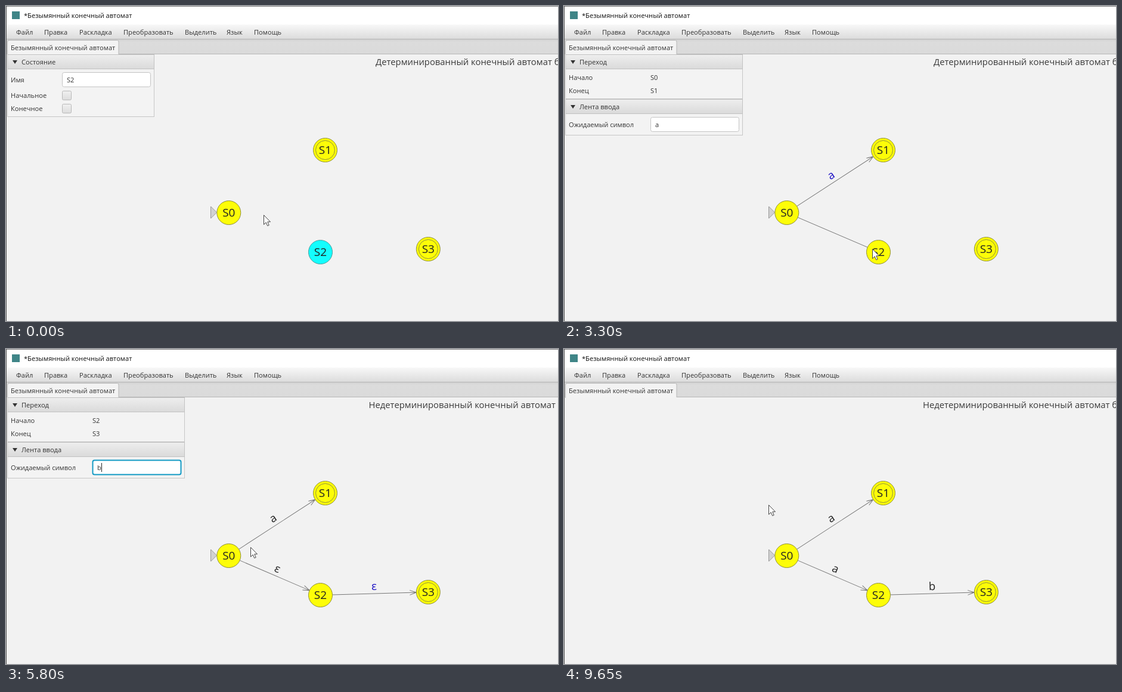
An HTML page that plays this animation: 926 px wide and 528 px high, repeating every 9.9 s.

```html
<!DOCTYPE html>
<html lang="ru">
<head>
<meta charset="utf-8">
<title>Конечный автомат</title>
<style>
  html, body { margin: 0; width: 100%; height: 100%; overflow: hidden; background: #f2f2f2; }
  svg { display: block; width: 926px; height: 528px; }
  text { font: 11.1px "Open Sans", "Noto Sans", sans-serif; fill: #333; white-space: pre; }
  .heading { font-size: 14.85px; fill: #3a3a3a; }
  .name { font-size: 19px; fill: #222; text-anchor: middle; }
  .label { font-size: 18.5px; fill: #222; text-anchor: middle; }
  .label.on { fill: #1c10c4; }
  .line { fill: none; stroke: #777; }
  .node circle { fill: #fdfd08; stroke: #8f8f3a; }
  .node.on circle { fill: #14fdfd; stroke: #4d9c9c; }
  .frame { fill: #f3f3f3; stroke: #c6c6c6; }
  .head { fill: url(#headFill); stroke: #c2c2c2; }
  .field { fill: #fff; stroke: #c4c4c4; }
  .field.on { stroke: #139ac4; stroke-width: 2; }
  .check { fill: url(#checkFill); stroke: #b8b8b8; }
</style>
</head>
<body>
<svg viewBox="0 0 926 528">
  <defs>
    <linearGradient id="menuFill" x2="0" y2="1"><stop stop-color="#f8f8f8"/><stop offset="1" stop-color="#dcdcdc"/></linearGradient>
    <linearGradient id="tabsFill" x2="0" y2="1"><stop stop-color="#cfcfcf"/><stop offset=".2" stop-color="#dcdcdc"/><stop offset="1" stop-color="#dadada"/></linearGradient>
    <linearGradient id="headFill" x2="0" y2="1"><stop stop-color="#eeeeee"/><stop offset="1" stop-color="#dadada"/></linearGradient>
    <linearGradient id="checkFill" x2="0" y2="1"><stop stop-color="#f0f0f0"/><stop offset="1" stop-color="#dddddd"/></linearGradient>
  </defs>

  <rect width="926" height="528" fill="#f2f2f2"/>
  <rect width="926" height="31" fill="#fff"/>
  <rect x="10" y="9" width="13" height="13" fill="#3f8587"/>
  <text x="30" y="20" style="fill:#111">*Безымянный конечный автомат</text>
  <rect y="31" width="926" height="24" fill="url(#menuFill)"/>
  <g id="menu"></g>
  <rect y="55" width="926" height="26" fill="url(#tabsFill)"/>
  <path d="M0 55.5H926M189 80.5H926" stroke="#b6b6b6"/>
  <path d="M2.5 82V60q0-2.5 2.5-2.5H186.5q2.5 0 2.5 2.5V81" fill="#f3f3f3" stroke="#b6b6b6"/>
  <text x="8" y="74">Безымянный конечный автомат</text>

  <text class="heading" id="heading" y="99"></text>

  <g id="statePanel">
    <rect class="frame" x="2.5" y="81.5" width="246" height="104"/>
    <rect class="head" x="2.5" y="81.5" width="246" height="24"/>
    <path d="M11 91h8l-4 6z" fill="#333"/>
    <text x="26" y="98">Состояние</text>
    <text x="8" y="128">Имя</text>
    <rect class="field" x="94.5" y="111.5" width="148" height="24" rx="3"/>
    <text x="102" y="128">S2</text>
    <text x="8" y="154">Начальное</text>
    <rect class="check" x="94.5" y="142.5" width="15" height="15" rx="2"/>
    <text x="8" y="176">Конечное</text>
    <rect class="check" x="94.5" y="164.5" width="15" height="15" rx="2"/>
  </g>

  <g id="edgePanel">
    <rect class="frame" x="2.5" y="81.5" width="297" height="135"/>
    <rect class="head" x="2.5" y="81.5" width="297" height="24"/>
    <path d="M11 91h8l-4 6z" fill="#333"/>
    <text x="26" y="98">Переход</text>
    <text x="8" y="124">Начало</text>
    <text x="145" y="124" id="from"></text>
    <text x="8" y="146">Конец</text>
    <text x="145" y="146" id="to"></text>
    <rect class="head" x="2.5" y="156.5" width="297" height="24"/>
    <path d="M2 155.5H300" stroke="#c6c6c6"/>
    <path d="M11 166h8l-4 6z" fill="#333"/>
    <text x="26" y="173">Лента ввода</text>
    <text x="8" y="203">Ожидаемый символ</text>
    <rect class="field" id="field" x="145.5" y="186.5" width="148" height="24" rx="3"/>
    <text x="153" y="203" id="input"></text>
    <path id="caret" d="M0 191V206" stroke="#222"/>
  </g>

  <path id="drag" class="line"/>
  <g id="edges"></g>
  <path d="M343.5 336V356L353.5 346z" fill="#d2d2d2" stroke="#999"/>
  <g id="nodes"></g>
  <path d="M0 .5H926" stroke="#777"/>
  <path d="M.5 0V528" stroke="#555"/>

  <g id="pointer">
    <path id="arrow" d="M.5.5V16.3L4.2 12.8 6.7 18.5 9.2 17.4 6.8 11.8H11.5z" fill="#fff" stroke="#444"/>
    <path id="beam" d="M-3.5-6.5H-1L.5-5.5 2-6.5H4.5M.5-5.5V6.5M-3.5 7.5H-1L.5 6.5 2 7.5H4.5" fill="none" stroke="#222"/>
  </g>
</svg>

<script>
const LOOP = 9900, STEP = 50, RADIUS = 20;
const $ = id => document.getElementById(id);

const menu = [['Файл', 17], ['Правка', 64], ['Раскладка', 123], ['Преобразовать', 197],
  ['Выделить', 300], ['Язык', 370], ['Помощь', 416]];
const nodes = [
  { x: 373.8, y: 346.5 },
  { x: 535.5, y: 241.5, final: true },
  { x: 527.5, y: 412.5 },
  { x: 708.3, y: 407.5, final: true }
];
const edges = [[0, 1], [0, 2], [2, 3]];

// Changes of state: each entry overrides the fields it names.
const events = [
  [0, { panel: 'state', node: 2, edge: -1, labels: ['', '', ''], text: '', focus: false, nfa: false, eps: false }],
  [1100, { panel: 'edge', node: -1, edge: 0, labels: ['ε', '', ''], text: 'ε', eps: true }],
  [1900, { focus: true }],
  [2050, { text: '' }],
  [2150, { text: 'a' }],
  [2350, { labels: ['a', '', ''], eps: false }],
  [2900, { focus: false }],
  [3350, { edge: 1, labels: ['a', 'ε', ''], text: 'ε', nfa: true, eps: true }],
  [4100, { edge: 2, labels: ['a', 'ε', 'ε'] }],
  [5300, { focus: true }],
  [5550, { text: '' }],
  [5700, { text: 'b' }],
  [6000, { labels: ['a', 'ε', 'b'] }],
  [6550, { edge: 1, text: 'ε', focus: false }],
  [7200, { focus: true }],
  [7300, { text: '' }],
  [7400, { text: 'a' }],
  [8000, { labels: ['a', 'a', 'b'], eps: false }],
  [8200, { panel: '', edge: -1, focus: false }]
];

// Pointer stops: time, x, y.
const stops = [
  [200, 432, 350], [500, 378, 346], [550, 378, 346], [1000, 533, 241], [1250, 533, 241],
  [1750, 241, 204], [2350, 241, 204], [2850, 378, 345], [2900, 378, 345], [3250, 517, 407],
  [3400, 517, 407], [3550, 523, 409], [3600, 523, 409], [3950, 710, 401], [4350, 710, 401],
  [5100, 240, 202], [5500, 240, 202], [5800, 410, 332], [6400, 452, 367], [6700, 452, 367],
  [7150, 241, 201], [7500, 241, 201], [7900, 332, 257], [8100, 343, 261]
];

// Rubber lines: start, end, node they leave from.
const drags = [[550, 1100, 0], [2900, 3350, 0], [3600, 4100, 2]];

$('menu').innerHTML = menu.map(([s, x]) => `<text x="${x}" y="48">${s}</text>`).join('');

$('nodes').innerHTML = nodes.map((n, i) => `<g class="node" transform="translate(${n.x} ${n.y})">
  <circle r="${RADIUS}"/>${n.final ? '<circle r="16"/>' : ''}<text class="name" y="6">S${i}</text></g>`).join('');

$('edges').innerHTML = edges.map(([a, b]) => {
  const p = nodes[a], q = nodes[b], dx = q.x - p.x, dy = q.y - p.y;
  const len = Math.hypot(dx, dy), deg = Math.atan2(dy, dx) * 180 / Math.PI, tip = len - RADIUS;
  return `<g transform="translate(${p.x} ${p.y}) rotate(${deg})">
    <path class="line" d="M${RADIUS} 0H${tip}m-11-4l11 4l-11 4"/>
    <text class="label" x="${len / 2}" y="-6"></text></g>`;
}).join('');

const nodeEls = [...$('nodes').children], edgeEls = [...$('edges').children];
const show = (el, on) => el.setAttribute('visibility', on ? 'inherit' : 'hidden');

function stateAt(t) {
  const state = {};
  for (const [at, change] of events) if (at <= t) Object.assign(state, change, { since: at });
  return state;
}

function pointerAt(t) {
  const i = stops.findIndex(s => s[0] > t);
  if (i === 0) return stops[0].slice(1);
  if (i < 0) return stops[stops.length - 1].slice(1);
  const [t0, x0, y0] = stops[i - 1], [t1, x1, y1] = stops[i];
  const u = (t - t0) / (t1 - t0), k = u * u * (3 - 2 * u);
  return [x0 + (x1 - x0) * k, y0 + (y1 - y0) * k];
}

function drawPanel(s, t) {
  show($('statePanel'), s.panel === 'state');
  show($('edgePanel'), s.panel === 'edge');
  if (s.edge >= 0) {
    $('from').textContent = 'S' + edges[s.edge][0];
    $('to').textContent = 'S' + edges[s.edge][1];
  }
  $('input').textContent = s.text;
  $('field').classList.toggle('on', s.focus);
  show($('caret'), s.focus && (t - s.since) % 1000 < 500);
  const width = s.text ? $('input').getComputedTextLength() : 0;
  $('caret').setAttribute('transform', `translate(${Math.round(153 + width) + .5} 0)`);
}

function drawGraph(s) {
  $('heading').textContent = (s.nfa ? 'Недетерминированный' : 'Детерминированный') +
    ' конечный автомат' + (s.eps ? '' : ' б');
  $('heading').setAttribute('x', (s.nfa ? 602 : 620) + (s.eps ? 6.5 : 0));
  nodeEls.forEach((el, i) => el.classList.toggle('on', i === s.node));
  edgeEls.forEach((el, i) => {
    const label = el.lastElementChild;
    show(el, s.labels[i]);
    label.textContent = s.labels[i];
    label.classList.toggle('on', i === s.edge);
  });
}

function drawPointer(s, t) {
  const [x, y] = pointerAt(t);
  const typing = s.panel === 'edge' && x > 145 && x < 294 && y > 186 && y < 211;
  $('pointer').setAttribute('transform', `translate(${Math.round(x)} ${Math.round(y)})`);
  show($('arrow'), !typing);
  show($('beam'), typing);
  const drag = drags.find(d => t >= d[0] && t < d[1]);
  show($('drag'), drag);
  if (drag) {
    const n = nodes[drag[2]];
    $('drag').setAttribute('d', `M${n.x} ${n.y}L${x + .5} ${y + 1}`);
  }
}

const start = performance.now();
function draw() {
  const t = Math.floor((performance.now() - start) % LOOP / STEP) * STEP;
  const s = stateAt(t);
  drawPanel(s, t);
  drawGraph(s);
  drawPointer(s, t);
  requestAnimationFrame(draw);
}
draw();
</script>
</body>
</html>
```
